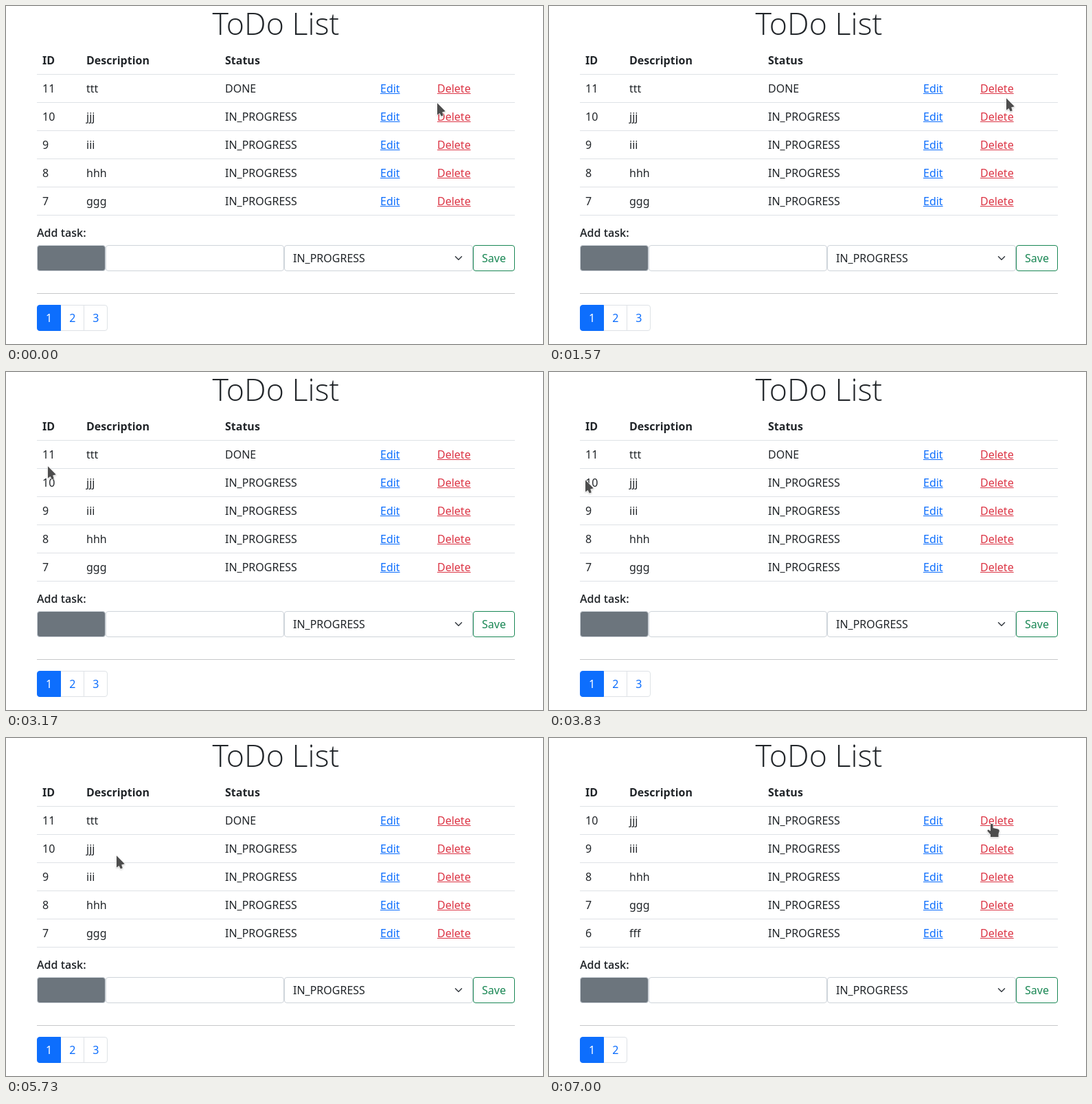
An HTML page that plays this animation: 782x492 px, repeating every 8000 ms.

```html
<!DOCTYPE html>
<html lang="en">
<head>
<meta charset="utf-8">
<title>ToDo List</title>
<style>
  * { box-sizing: border-box; }
  html, body { margin: 0; width: 100%; height: 100%; overflow: hidden; background: #fff; }
  body { font: 16px/24px "Noto Sans", "Open Sans", sans-serif; color: #212529; }
  #stage { position: relative; width: 782px; height: 492px; overflow: hidden; }
  #stage > * { position: absolute; }
  h1 { left: 45px; top: -2.5px; width: 696px; margin: 0; text-align: center; font: 300 44.8px/54px "Open Sans", "Noto Sans", sans-serif; }
  .row { left: 45px; width: 696px; height: 41px; padding: 8px; border-bottom: 1px solid #dee2e6; display: grid; grid-template-columns: 64px 202px 226px 83px auto; }
  .head { top: 59px; font-weight: 700; }
  .edit, .delete { text-decoration: underline; justify-self: start; }
  .edit { color: #0d6efd; }
  .delete { color: #dc3545; }
  .label { left: 45px; top: 318px; font-family: "Open Sans", "Noto Sans", sans-serif; font-weight: 550; }
  .box { top: 348px; height: 38px; padding: 6px 12px; border: 1px solid #ced4da; border-radius: 4px; background: #fff; }
  .box svg { position: absolute; right: 12px; top: 12px; }
  .id { left: 45px; width: 100px; background: #6c757d; }
  .text { left: 145px; width: 260px; }
  .select { left: 405px; width: 275px; }
  .save { left: 680px; width: 61px; color: #198754; border-color: #198754; }
  .rule { left: 45px; top: 418px; width: 696px; height: 1px; background: #c7c8ca; }
  .pages { left: 45px; top: 435px; display: flex; }
  .pages b { height: 38px; padding: 6px 12px; border: 1px solid #dee2e6; font-weight: 400; color: #0d6efd; }
  .pages b + b { margin-left: -1px; }
  .pages b:first-child { position: relative; z-index: 1; color: #fff; background: #0d6efd; border-color: #0d6efd; border-radius: 4px 0 0 4px; }
  .pages b:last-child { border-radius: 0 4px 4px 0; }
  #cursor { left: 0; top: 0; overflow: visible; filter: drop-shadow(0 1px 1px rgba(0, 0, 0, .2)); }
  #cursor path { fill: #4d4d4d; stroke: #fff; stroke-width: 1.2; stroke-linejoin: round; paint-order: stroke; }
</style>
</head>
<body>
<div id="stage">
  <h1>ToDo List</h1>
  <div class="row head"><span>ID</span><span>Description</span><span>Status</span></div>
  <div class="label">Add task:</div>
  <div class="box id"></div>
  <div class="box text"></div>
  <div class="box select">IN_PROGRESS
    <svg width="16" height="12" viewBox="0 0 16 16"><path d="M2 5l6 6 6-6" fill="none" stroke="#343a40" stroke-width="2" stroke-linecap="round" stroke-linejoin="round"/></svg>
  </div>
  <div class="box save">Save</div>
  <div class="rule"></div>
  <div class="pages"></div>
  <svg id="cursor" width="1" height="1"><path/></svg>
</div>
<script>
  const LOOP = 8000, DELETED = 6870;
  const ARROW = 'M0 -.8V16.4L3.6 14L5.9 18.6L8.8 17.3L7.2 12.4L11.8 11.3Z';
  const HAND = 'M-2 1.5A1.8 1.8 0 0 1 1.6 1.5V6L8.5 7.5Q11 8 10.8 10.5L9.5 14.5V19H-2V15.5L-6.5 10.5Q-7 8.5 -5 8.5L-2 10.5Z';

  // main stops of the pointer: time, x, y
  const STOPS = [
    [0, 628, 142], [400, 628, 142], [430, 628, 146], [700, 628, 146],
    [1030, 681, 135], [1530, 670, 135], [2170, 604, 139], [2330, 244, 165],
    [2850, 42, 150], [3170, 61, 138], [4570, 63, 181], [5270, 65, 218],
    [5630, 65, 218], [5730, 160, 172], [6000, 480, 122], [6400, 645, 125], [LOOP, 645, 125]
  ];
  // side-to-side sway while the pointer drifts down the ID column
  const SWAY = { from: 3170, to: 5270, period: 700, size: 25 };

  const stage = document.getElementById('stage');
  const cursor = document.getElementById('cursor');
  const shape = cursor.querySelector('path');
  const pages = stage.querySelector('.pages');
  const times = (n, make) => Array.from({ length: n }, (_, i) => make(i));

  const rows = times(5, i => {
    const row = document.createElement('div');
    row.className = 'row';
    row.style.top = 100 + 41 * i + 'px';
    stage.insertBefore(row, cursor);
    return row;
  });

  let shown = 0;
  function showFrom(first) {
    if (first === shown) return;
    shown = first;
    rows.forEach((row, i) => {
      const id = first - i;
      const name = 'abcdefghijt'[id - 1].repeat(3);
      const status = id === 11 ? 'DONE' : 'IN_PROGRESS';
      row.innerHTML = `<span>${id}</span><span>${name}</span><span>${status}</span>` +
        '<span class="edit">Edit</span><span class="delete">Delete</span>';
    });
    pages.innerHTML = times(Math.ceil(first / 5), i => `<b>${i + 1}</b>`).join('');
  }

  function pointAt(t) {
    const i = STOPS.findIndex(stop => stop[0] > t);
    const [t0, x0, y0] = STOPS[i - 1], [t1, x1, y1] = STOPS[i];
    const k = (t - t0) / (t1 - t0);
    const swaying = t > SWAY.from && t < SWAY.to;
    const sway = swaying ? SWAY.size * Math.sin(2 * Math.PI * (t - SWAY.from) / SWAY.period) : 0;
    return [Math.round(x0 + (x1 - x0) * k + sway), Math.round(y0 + (y1 - y0) * k)];
  }

  function overLink(x, y) {
    const inRow = (y - 100) % 41;
    const inColumn = (x >= 545 && x <= 573) || (x >= 628 && x <= 677);
    return inColumn && inRow >= 9 && inRow <= 31;
  }

  function draw(t) {
    showFrom(t < DELETED ? 11 : 10);
    const [x, y] = pointAt(t);
    shape.setAttribute('d', overLink(x, y) ? HAND : ARROW);
    cursor.style.transform = `translate(${x}px, ${y}px)`;
  }

  const start = performance.now();
  function frame() {
    draw((performance.now() - start) % LOOP);
    requestAnimationFrame(frame);
  }
  frame();
</script>
</body>
</html>
```
